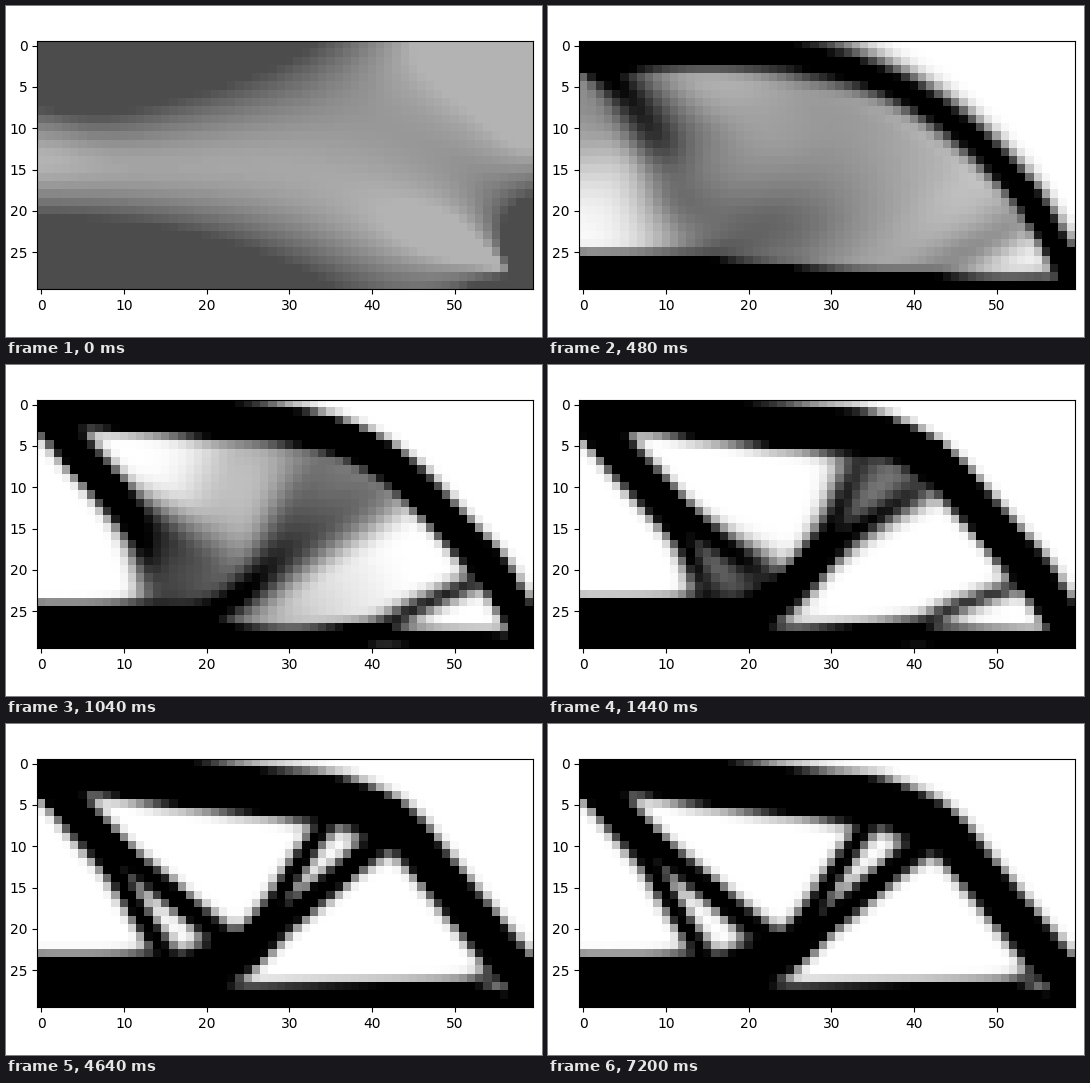
These frames come from a looping animation (536 by 331 pixels, 7440 ms). A matplotlib script:

```python
import numpy as np
import matplotlib.pyplot as plt
from matplotlib.animation import FuncAnimation
from matplotlib.colors import Normalize

# Topology optimisation of a half MBB beam: SIMP, sensitivity filter, OC update
NELX, NELY = 60, 30
VOLFRAC, PENAL, RMIN = 0.5, 3.0, 1.5
E_MIN, E_MAX, NU = 1e-9, 1.0, 0.3
MOVE = 0.2
STEPS, INTERVAL = 93, 80
NDOF = 2 * (NELY + 1)  # degrees of freedom in one column of nodes

# Axes box in pixels; the fractions settle how edges and ticks snap
WIDTH, HEIGHT, DPI = 536, 331, 100
LEFT, BOTTOM, AX_W, AX_H = 31.2, 47.55, 495.9, 248.05


def element_stiffness():
    k = np.array([1/2 - NU/6, 1/8 + NU/8, -1/4 - NU/12, -1/8 + 3*NU/8,
                  -1/4 + NU/12, -1/8 - NU/8, NU/6, 1/8 - 3*NU/8])
    order = np.array([[0, 1, 2, 3, 4, 5, 6, 7],
                      [1, 0, 7, 6, 5, 4, 3, 2],
                      [2, 7, 0, 5, 6, 3, 4, 1],
                      [3, 6, 5, 0, 7, 2, 1, 4],
                      [4, 5, 6, 7, 0, 1, 2, 3],
                      [5, 4, 3, 2, 1, 0, 7, 6],
                      [6, 3, 4, 1, 2, 7, 0, 5],
                      [7, 2, 1, 4, 3, 6, 5, 0]])
    return k[order] / (1 - NU**2)


KE = element_stiffness()

# Local dofs of each element in a strip between two node columns
row = 2 * np.arange(NELY)[:, None]
EDOF = row + np.array([2, 3, NDOF + 2, NDOF + 3, NDOF, NDOF + 1, 0, 1])

STRIP = np.zeros((NELY, 2 * NDOF, 2 * NDOF))
for r in range(NELY):
    STRIP[r][np.ix_(EDOF[r], EDOF[r])] = KE


def displacements(x):
    """Solve the block tridiagonal system, one node column at a time."""
    stiff = E_MIN + x**PENAL * (E_MAX - E_MIN)
    strips = np.tensordot(stiff, STRIP, axes=1)
    diag = np.zeros((NELX + 1, NDOF, NDOF))
    diag[:-1] += strips[:, :NDOF, :NDOF]
    diag[1:] += strips[:, NDOF:, NDOF:]
    upper = strips[:, :NDOF, NDOF:].copy()

    # Symmetry on the left edge, roller at the lower right corner
    rollers = np.arange(0, NDOF, 2)
    for block, fixed in ((diag[0], rollers), (diag[-1], [NDOF - 1])):
        block[fixed, :] = 0
        block[:, fixed] = 0
        block[fixed, fixed] = 1
    upper[0][rollers, :] = 0
    upper[-1][:, NDOF - 1] = 0

    load = np.zeros((NELX + 1, NDOF))
    load[0, 1] = -1
    reduced = []
    for i in range(NELX):
        sol = np.linalg.solve(diag[i], np.column_stack([upper[i], load[i]]))
        diag[i + 1] -= upper[i].T @ sol[:, :-1]
        load[i + 1] -= upper[i].T @ sol[:, -1]
        reduced.append(sol)

    u = np.zeros((NELX + 1, NDOF))
    u[-1] = np.linalg.solve(diag[-1], load[-1])
    for i in reversed(range(NELX)):
        u[i] = reduced[i][:, -1] - reduced[i][:, :-1] @ u[i + 1]
    return u


def cone_sum(field):
    reach = int(np.ceil(RMIN)) - 1
    padded = np.pad(field, reach)
    total = np.zeros_like(field)
    for dx in range(-reach, reach + 1):
        for dy in range(-reach, reach + 1):
            weight = max(0.0, RMIN - np.hypot(dx, dy))
            total += weight * padded[reach + dx:reach + dx + NELX,
                                     reach + dy:reach + dy + NELY]
    return total


CONE_WEIGHT = cone_sum(np.ones((NELX, NELY)))


def sensitivity(x):
    u = displacements(x)
    ue = np.hstack([u[:-1], u[1:]])[:, EDOF]
    energy = ((ue @ KE) * ue).sum(axis=-1)
    dc = -PENAL * x**(PENAL - 1) * (E_MAX - E_MIN) * energy
    return cone_sum(x * dc) / CONE_WEIGHT / np.maximum(0.001, x)


def update_density(x, dc, drift):
    low, high = 0.0, 1e9
    lower = np.maximum(0, x - MOVE)
    upper = np.minimum(1, x + MOVE)
    while (high - low) / (low + high) > 1e-3:
        mid = (low + high) / 2
        new = np.clip(x * np.sqrt(np.maximum(0, -dc) / mid), lower, upper)
        excess = drift + np.sum(new - x)
        if excess > 0:
            low = mid
        else:
            high = mid
    return new, excess


def optimise():
    x = np.full((NELX, NELY), VOLFRAC)
    drift = 0.0
    history = []
    for _ in range(STEPS):
        x, drift = update_density(x, sensitivity(x), drift)
        history.append(-x.T)
    return history


designs = optimise()

fig = plt.figure(figsize=(WIDTH / DPI, HEIGHT / DPI), dpi=DPI, facecolor="white")
ax = fig.add_axes([LEFT / WIDTH, BOTTOM / HEIGHT, AX_W / WIDTH, AX_H / HEIGHT])
image = ax.imshow(designs[0], cmap="gray", interpolation="none",
                  norm=Normalize(-1, 0), aspect="auto")
ax.set_xticks(range(0, NELX, 10))
ax.set_yticks(range(0, NELY, 5))


def draw(i):
    image.set_data(designs[i])
    return [image]


anim = FuncAnimation(fig, draw, frames=STEPS, interval=INTERVAL,
                     repeat=True, repeat_delay=0)
plt.show()
```
